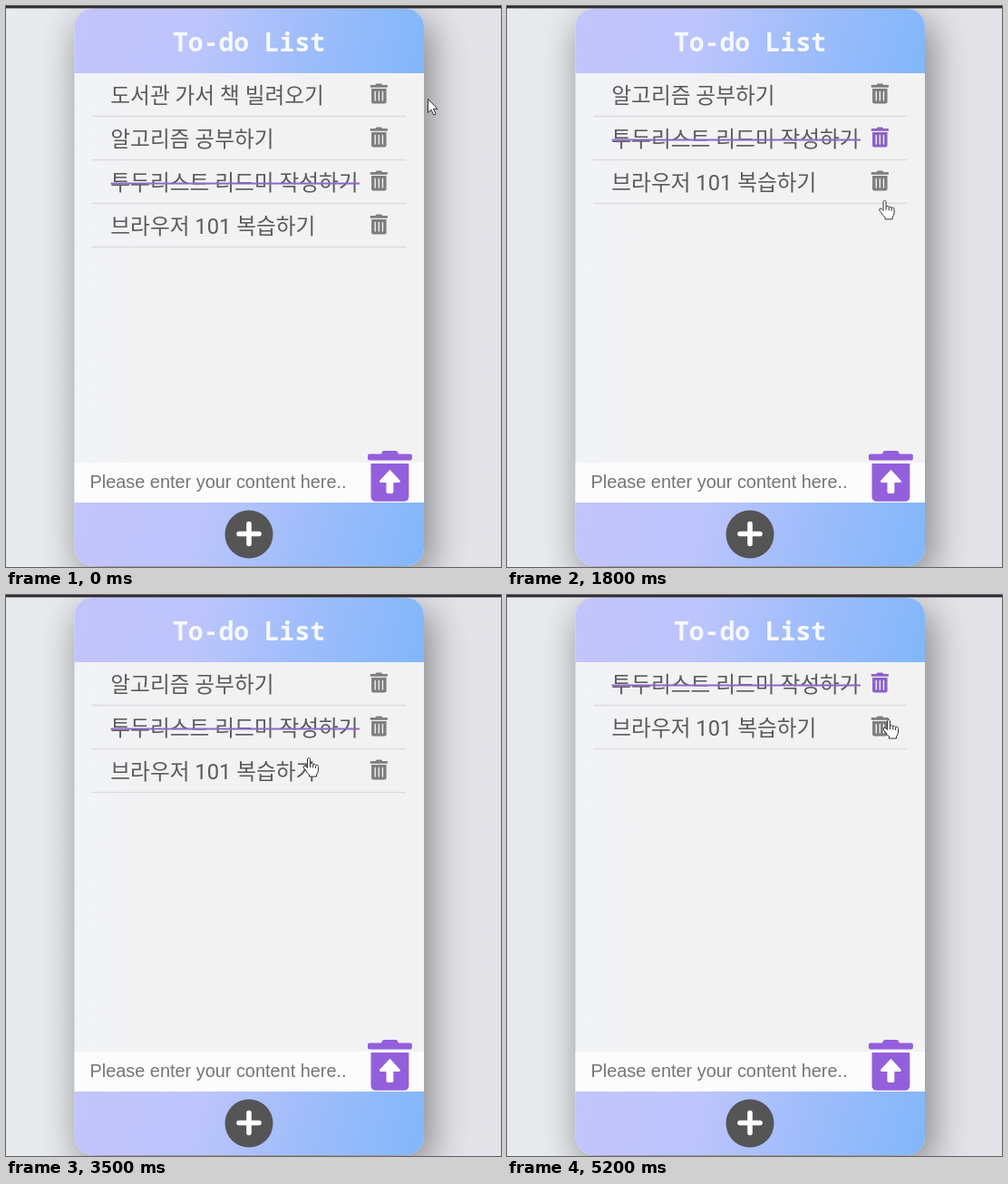
An HTML page for the animation above (5300 ms loop, 546x618 px).

```html
<!DOCTYPE html>
<html lang="ko">
<head>
<meta charset="utf-8">
<title>To-do List</title>
<style>
html, body { margin: 0; width: 100%; height: 100%; overflow: hidden; background: #e5e6ea; }
svg { display: block; width: 546px; height: 618px; }
.title { font: 700 28px "Noto Sans Mono", monospace; fill: #f6f9ff; text-anchor: middle; }
.item { font: 400 23.7px Roboto, "Noto Sans CJK KR", "Noto Sans CJK", sans-serif; fill: #5b5b5d; }
.hint { font: 19.9px "Liberation Sans", Arial, sans-serif; fill: #757577; }
</style>
</head>
<body>
<svg viewBox="0 0 546 618" xmlns="http://www.w3.org/2000/svg">
  <defs>
    <linearGradient id="page">
      <stop offset="0" stop-color="#e7ebee"/><stop offset="1" stop-color="#e3e2e8"/>
    </linearGradient>
    <linearGradient id="bar" gradientUnits="userSpaceOnUse" x1="75" y1="0" x2="448" y2="100">
      <stop offset="0" stop-color="#c3c4fc"/><stop offset=".36" stop-color="#bdc5fc"/>
      <stop offset=".65" stop-color="#a0bdfb"/><stop offset="1" stop-color="#82b7fa"/>
    </linearGradient>
    <linearGradient id="paper">
      <stop offset="0" stop-color="#f1f4f7"/><stop offset=".16" stop-color="#f2f2f4"/>
      <stop offset="1" stop-color="#f2f2f3"/>
    </linearGradient>
    <filter id="soft" x="-40%" y="-40%" width="180%" height="180%"><feGaussianBlur stdDeviation="21"/></filter>
    <clipPath id="card"><rect x="75.5" y="3" width="385.5" height="614" rx="20"/></clipPath>
    <path id="lid" d="M432 32H312l-9.4-18.7A24 24 0 0 0 281 0H167a24 24 0 0 0-21.600 13.300L136 32H16A16 16 0 0 0 0 48v32a16 16 0 0 0 16 16h416a16 16 0 0 0 16-16V48a16 16 0 0 0-16-16z"/>
    <path id="bin" d="M32 128H416V464a48 48 0 0 1-48 48H80a48 48 0 0 1-48-48z"/>
    <g id="trash" transform="scale(.043)">
      <use href="#lid"/><use href="#bin"/>
      <path d="M128 208V432M224 208V432M320 208V432" stroke="#f2f2f3" stroke-width="32" stroke-linecap="round"/>
    </g>
  </defs>

  <rect width="546" height="618" fill="url(#page)"/>
  <rect x="80" y="16" width="389" height="614" rx="20" opacity=".42" filter="url(#soft)"/>
  <rect width="546" height="2.500" fill="#2c2a30"/>

  <g clip-path="url(#card)">
    <rect x="75" y="3" width="387" height="615" fill="url(#paper)"/>
    <rect x="75" y="3" width="387" height="71" fill="url(#bar)"/>
    <rect x="75" y="503" width="387" height="44" fill="#fcfcfd"/>
    <rect x="75" y="547" width="387" height="71" fill="url(#bar)" id="foot"/>
  </g>
  <text class="title" x="268" y="50">To-do List</text>
  <g id="list"></g>

  <text class="hint" x="92.500" y="531">Please enter your content here..</text>
  <g transform="translate(399 490) scale(.109)" fill="#945fdb">
    <use href="#lid"/><use href="#bin"/>
    <path d="M224 190L328 302Q334 318 318 320H260V416Q260 432 244 432H204Q188 432 188 416V320H130Q114 318 120 302Z" fill="#fff"/>
  </g>
  <circle cx="268" cy="582" r="26.500" fill="#555556"/>
  <path d="M257 581.500H279M268 570.500V592.500" stroke="#fff" stroke-width="5.600" stroke-linecap="round"/>

  <g id="pointer" fill="#fff" stroke="#333" stroke-width="1" stroke-linejoin="round">
    <path id="arrow" d="M.5.5V15.500L4 12.200L6.600 18L9 17L6.400 11.300H11Z"/>
    <path id="hand" d="M-1.500 1.500Q0-1 1.500 1.500V7Q3.500 5.500 4.700 7.600Q6.500 6.400 7.600 8.400Q10.500 7.300 10.500 10.500V14Q10 17 8.500 19V21H.5V19Q-2 17-3.500 14L-6 11Q-6 8.300-3.500 9.500L-1.500 11.500ZM1.500 7V11M4.700 8V11.500M7.600 9V12"/>
    <path id="beam" fill="none" stroke="#222" stroke-width="1.300" d="M-4-8H-1.500L0-7L1.500-8H4M0-7V7M-4 8H-1.500L0 7L1.500 8H4"/>
  </g>
</svg>
<script>
const LOOP = 5300, STEP = 100, ROW = 48;
const $ = id => document.getElementById(id);
const GREY = [126, 126, 128], PURPLE = [139, 98, 200];

// the footer repeats the header gradient
const footBar = $('bar').cloneNode(true);
footBar.id = 'bar2';
footBar.setAttribute('gradientTransform', 'translate(0 544)');
$('bar').after(footBar);
$('foot').setAttribute('fill', 'url(#bar2)');

const items = [
  { text: '도서관 가서 책 빌려오기', gone: 600 },
  { text: '알고리즘 공부하기', gone: 4900 },
  { text: '투두리스트 리드미 작성하기', done: true },
  { text: '브라우저 101 복습하기' }
];
for (const it of items) {
  const g = document.createElementNS('http://www.w3.org/2000/svg', 'g');
  g.innerHTML = `<text class="item" x="115.300" y="107">${it.text}</text>` +
    (it.done ? '<path d="M115.500 99.500H390" stroke="#8e68c6" stroke-width="2"/>' : '') +
    '<path d="M95 121.500H441" stroke="#dcdce0" stroke-width="1.400"/>' +
    '<use href="#trash" x="0" y="0" transform="translate(401.700 85.500)"/>';
  $('list').append(g);
  it.node = g;
  it.icon = g.querySelector('use');
}

// time, x, y of the pointer tip
const path = [
  [0, 465, 102], [200, 464, 101], [500, 409, 91], [1100, 408, 91],
  [1400, 403, 144], [1700, 410, 160], [2100, 452, 505], [2300, 456, 516],
  [2700, 456, 516], [3200, 350, 505], [3500, 334, 179], [4100, 332, 178],
  [4500, 431, 140], [4800, 411, 92], [4900, 411, 92], [5200, 421, 137]
];
// time and purple strength of the icons in the first two rows
const glow = [
  [[0, 0], [400, 0], [500, 1], [1200, 1], [1400, .6], [1700, 0], [4700, 0], [4800, 1], [5200, 1]],
  [[0, 0], [1400, 0], [1600, 1], [1800, 1], [2000, 0], [5200, 0]]
];

function at(keys, t) {
  let i = 0;
  while (i < keys.length - 2 && keys[i + 1][0] <= t) i++;
  const a = keys[i], b = keys[i + 1];
  let u = Math.min(1, (t - a[0]) / (b[0] - a[0]));
  u = u * u * (3 - 2 * u);
  return a.slice(1).map((v, k) => v + (b[k + 1] - v) * u);
}

function shape(x, y, rows) {
  if (y > 503 && y < 547 && x < 461) return x > 398 && x < 448 ? 'hand' : 'beam';
  const inRow = y > 74 && y < 74 + rows * ROW;
  return inRow && (x > 115 && x < 390 || x > 400 && x < 423) ? 'hand' : 'arrow';
}

function draw(t) {
  let row = 0;
  for (const it of items) {
    const shown = !(t >= it.gone);
    it.node.style.display = shown ? '' : 'none';
    if (!shown) continue;
    it.node.setAttribute('transform', `translate(0 ${row * ROW})`);
    const k = glow[row] ? at(glow[row], t)[0] : 0;
    it.icon.setAttribute('fill', `rgb(${GREY.map((c, i) => Math.round(c + (PURPLE[i] - c) * k))})`);
    row++;
  }
  const [x, y] = at(path, t), kind = shape(x, y, row);
  $('pointer').setAttribute('transform', `translate(${x.toFixed(1)} ${y.toFixed(1)})`);
  for (const id of ['arrow', 'hand', 'beam']) $(id).style.display = id === kind ? '' : 'none';
}

const start = performance.now();
function tick() {
  const t = (performance.now() - start) % LOOP;
  draw(Math.floor(t / STEP) * STEP);
  requestAnimationFrame(tick);
}
draw(0);
requestAnimationFrame(tick);
</script>
</body>
</html>
```
